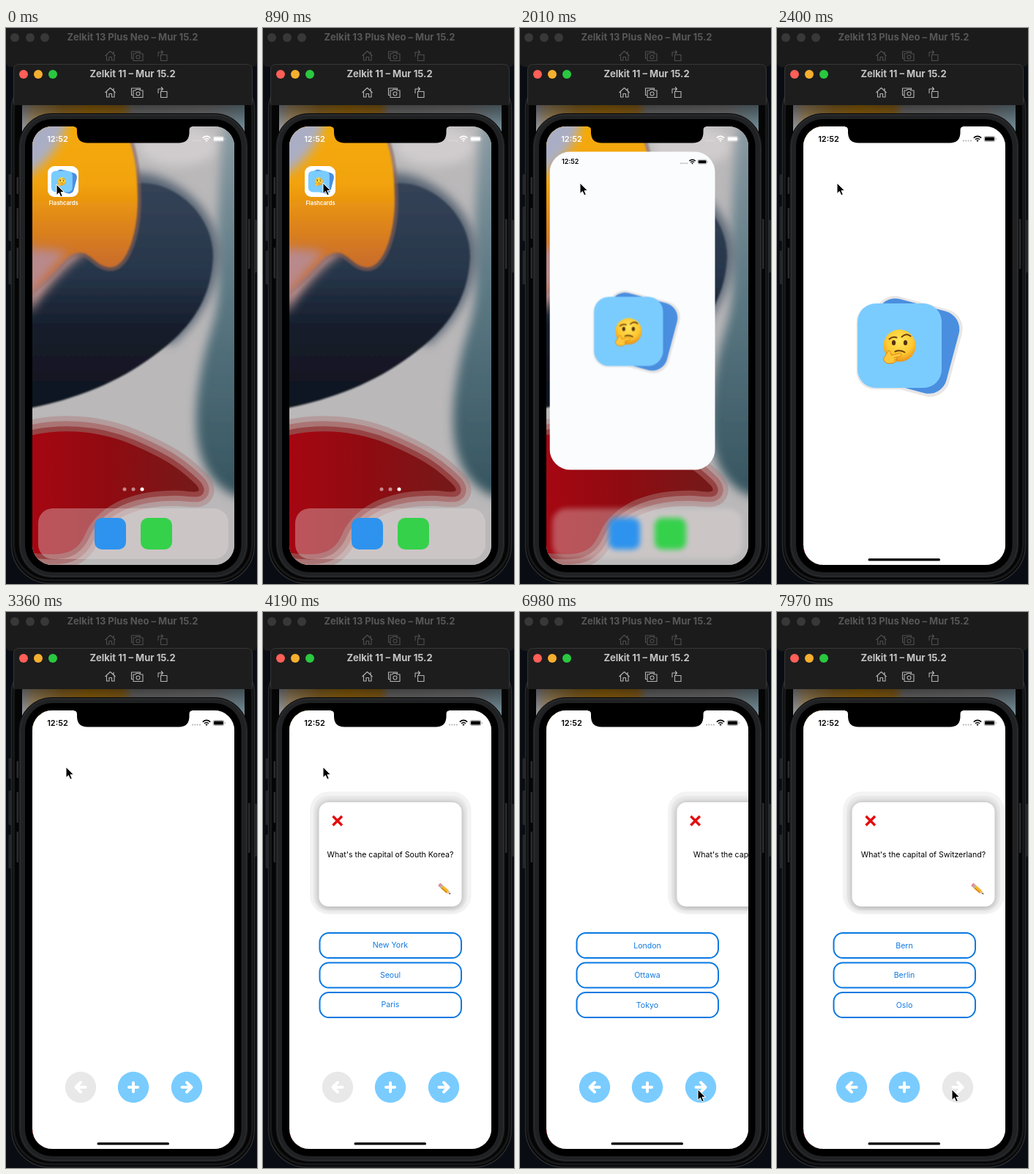
Write an HTML page that moves like this. It is 343 px wide and 757 px high and loops after 8 s.

```html
<!DOCTYPE html>
<html lang="en">
<head>
<meta charset="utf-8">
<title>Flashcards demo</title>
<style>
@property --p { syntax: '<number>'; inherits: true; initial-value: 0; }

html, body { margin: 0; width: 100%; height: 100%; overflow: hidden; background: #090d13; }
svg { position: absolute; left: 0; top: 0; display: block; }
text { font-family: Inter, Roboto, sans-serif; text-anchor: middle; }

.stage { position: relative; width: 343px; height: 757px; overflow: hidden; }
.stage, .stage * { animation: 8s linear infinite; animation-name: none; }
.screen {
  position: absolute; left: 36px; top: 134px; width: 276px; height: 597px;
  border-radius: 27px; overflow: hidden; background: #bab8b9;
}
.title { font-size: 13px; font-weight: 700; }
.clock { font-size: 11px; font-weight: 600; }
.label { font-size: 7.6px; font-weight: 600; fill: #fff; opacity: calc(1 - 3 * var(--p)); }

/* --p runs from icon (0) to full screen (1) */
.screen { animation-name: launch; }
.dock { filter: blur(calc(var(--p) * 5px)); }
.dots { opacity: calc(1 - 1.6 * var(--p)); }
.app {
  position: absolute; left: 0; top: 0; width: 276px; height: 597px;
  color: #000; transform-origin: 0 0;
  background: color-mix(in srgb, #fff calc(var(--p) * 100%), #e6f3fa);
  clip-path: inset(0 0 calc(321px * (1 - var(--p))) 0 round calc(64px - 37px * var(--p)));
  transform:
    translate(calc(21px * (1 - var(--p))), calc(54px + 82px * var(--p) - 136px * var(--p) * var(--p)))
    scale(calc(.1522 + .8478 * var(--p)));
}
.icon { opacity: clamp(0, 1 - 2.3 * var(--p), 1); }
@keyframes launch {
  0%, 20.125% { --p: 0; animation-timing-function: cubic-bezier(.39, 0, .2, 1); }
  30%, 100% { --p: 1; }
}

.splash { animation-name: leave; }
.nav { animation-name: enter; }
.quiz { animation-name: reveal; }
@keyframes leave { 0%, 38.75% { opacity: 1; } 42%, 100% { opacity: 0; } }
@keyframes enter { 0%, 38.75% { opacity: 0; } 42%, 100% { opacity: 1; } }
@keyframes reveal {
  0%, 44.625% { opacity: 0; animation-timing-function: ease-in-out; }
  52.375%, 100% { opacity: 1; }
}

.card { animation-name: slide; }
@keyframes slide {
  0% { transform: none; }
  81.67% { transform: none; animation-timing-function: cubic-bezier(.455, .03, .515, .955); }
  85.419% { transform: translateX(-275px); }
  85.42% { transform: translateX(275px); animation-timing-function: cubic-bezier(.455, .03, .515, .955); }
  89.17% { transform: none; }
  92.963% { transform: none; animation-timing-function: cubic-bezier(.455, .03, .515, .955); }
  96.712% { transform: translateX(-275px); }
  96.713% { transform: translateX(275px); animation-timing-function: cubic-bezier(.471, .028, .571, .821); }
  100% { transform: translateX(9px); }
}

.quiz text { font-size: 10.6px; }
.answers text { fill: #117ae2; }
.answers rect { fill: #fff; stroke: #0a78e2; stroke-width: 2; }
.q1, .q2, .q3, .prev, .next { animation-timing-function: step-end; }
.q1 { animation-name: first; }
.q2 { animation-name: second; }
.q3 { animation-name: third; }
@keyframes first { 0% { opacity: 1; } 85.42%, 100% { opacity: 0; } }
@keyframes second { 0% { opacity: 0; } 85.42% { opacity: 1; } 96.713%, 100% { opacity: 0; } }
@keyframes third { 0% { opacity: 0; } 96.713%, 100% { opacity: 1; } }

.nav circle { fill: #7accff; }
.nav path { fill: none; stroke: #fff; stroke-width: 4; stroke-linecap: round; stroke-linejoin: round; }
.nav .prev { animation-name: enable; }
.nav .next { animation-name: disable; }
@keyframes enable { 0% { fill: #e8e8e8; } 85.42%, 100% { fill: #7accff; } }
@keyframes disable { 0% { fill: #7accff; } 96.713%, 100% { fill: #e8e8e8; } }

.cursor { animation-name: point; }
@keyframes point {
  0%, 6.749% { transform: translate(69px, 213px); }
  6.75%, 10.375% { transform: translate(75px, 212px); }
  11.125%, 56% { transform: translate(82px, 211px); }
  57.375%, 62.6% { transform: translate(121px, 231px); animation-timing-function: ease-in-out; }
  70.625% { transform: translate(244px, 632px); }
  72.6%, 73.4% { transform: translate(251px, 642px); }
  76.25%, 92.4% { transform: translate(243px, 650px); }
  93.5%, 100% { transform: translate(239px, 650px); }
}
</style>
</head>
<body>
<div class="stage">

<!-- simulator windows and device frames -->
<svg width="343" height="757">
  <defs>
    <linearGradient id="strip">
      <stop offset="0" stop-color="#9fa3ae"/><stop offset=".05" stop-color="#b39a70"/>
      <stop offset=".18" stop-color="#a87a2a"/><stop offset=".3" stop-color="#b0780c"/>
      <stop offset=".45" stop-color="#a5731b"/><stop offset=".5" stop-color="#828182"/>
      <stop offset=".85" stop-color="#8a8a8c"/><stop offset="1" stop-color="#7d9aa6"/>
    </linearGradient>
    <linearGradient id="shadow" x2="0" y2="1">
      <stop offset="0" stop-color="#000" stop-opacity=".5"/><stop offset="1" stop-color="#000" stop-opacity="0"/>
    </linearGradient>
    <g id="tools" fill="none" stroke="currentColor" stroke-width="1.1" stroke-linejoin="round">
      <path d="M135.500 88l7-6.500 7 6.500M137.500 87v7h3.500v-4.500h3.500v4.500h3.500v-7M147 85v-3"/>
      <path d="M173.500 91.500h-2v-9.500h12v2"/>
      <path d="M174 85h3l1-1.500h4l1 1.500h4v9.500h-13z"/><circle cx="180.500" cy="89.500" r="2.500"/>
      <path d="M211.500 86.500h8.500v8h-8.500zM208 89v-6h6M212 80.500l2.500 2.500-2.500 2.500"/>
    </g>
    <g id="status" fill="currentColor">
      <text class="clock" x="70.500" y="155">12:52</text>
      <g opacity=".3"><circle cx="255" cy="153.500" r="1.100"/><circle cx="258.300" cy="153.500" r="1.100"/><circle cx="261.600" cy="153.500" r="1.100"/><circle cx="265" cy="153.500" r="1.100"/></g>
      <g fill="none" stroke="currentColor" stroke-width="1.500"><path d="M268.800 149.600q5.200-4.400 10.400 0M270.900 151.800q3.100-2.600 6.200 0"/></g>
      <path d="M274 155l-1.700-1.900q1.700-1.300 3.400 0z"/>
      <rect x="283" y="147.500" width="15" height="7" rx="2.200" fill="none" stroke="currentColor" stroke-opacity=".4" stroke-width=".8"/>
      <rect x="284" y="148.500" width="13" height="5" rx="1.300"/><path d="M299 149.800q1.600 1.200 0 2.400z" opacity=".5"/>
    </g>

    <!-- thinking face, centred on 0,0 -->
    <radialGradient id="skin" cx=".5" cy=".35" r=".65">
      <stop offset="0" stop-color="#ffe65c"/><stop offset=".65" stop-color="#fdc831"/><stop offset="1" stop-color="#e8921a"/>
    </radialGradient>
    <g id="face">
      <circle r="22" fill="url(#skin)"/>
      <ellipse cx="-8" cy="-4" rx="2.600" ry="3.500" fill="#55310d"/><ellipse cx="8" cy="-4" rx="2.600" ry="3.500" fill="#55310d"/>
      <g fill="none" stroke="#6b3d0d" stroke-width="2" stroke-linecap="round">
        <path d="M-14-9q5-4 10-2M3-12q6-6 12-1M-6 8q6-3 13 1"/>
      </g>
      <path d="M-16 8q3-3 4 2l1 3 11-3q4 0 2 4l-6 3q0 6-6 7-10 2-12-6z" fill="#ffc83a" stroke="#dc8615"/>
      <path d="M-8 17l6-2M-8 20l5-2" stroke="#dc8615"/>
    </g>
    <!-- pair of cards, front card centred on 0,0 -->
    <g id="deck">
      <rect x="-57.500" y="-57.500" width="115" height="115" rx="25" transform="translate(17 .5) rotate(15)" fill="#4a8edf"/>
      <rect x="-57.500" y="-57.500" width="115" height="115" rx="25" fill="#7accff"/>
      <use href="#face"/>
    </g>
  </defs>

  <rect width="343" height="757" fill="#090d13"/>
  <g fill="#24272b">
    <rect x="3.500" y="199" width="5" height="28" rx="1.500"/><rect x="3.500" y="243" width="5" height="47" rx="1.500"/>
    <rect x="3.500" y="303" width="5" height="46" rx="1.500"/><rect x="338" y="261" width="5" height="72" rx="1.500"/>
  </g>
  <rect x="7.500" y="60" width="332" height="696" rx="52" fill="#050505" stroke="#2b2c2e" stroke-width="1.500"/>
  <rect x="10.500" y="62" width="326" height="690" rx="50" fill="none" stroke="#171819" stroke-width="3"/>
  <path d="M22 90h304v90H22z" fill="url(#strip)"/>
  <path d="M22 105h304v38H22z" fill="url(#shadow)"/>
  <path d="M0 0h343v46q0 7-7 7H7q-7 0-7-7z" fill="#1b1b1b"/>
  <g fill="#383838"><circle cx="12" cy="13" r="6"/><circle cx="33" cy="13" r="6"/><circle cx="53" cy="13" r="6"/></g>
  <text class="title" x="173" y="17" fill="#575757">Zelkit 13 Plus Neo – Mur 15.2</text>
  <use href="#tools" y="-50" color="#4e4e4e"/>

  <g fill="#2a2b2d">
    <rect x="14.500" y="203" width="4" height="23" rx="1"/><rect x="14.500" y="245" width="4" height="42" rx="1"/>
    <rect x="14.500" y="299" width="4" height="42" rx="1"/><rect x="329.500" y="260" width="4" height="68" rx="1"/>
  </g>
  <rect x="17.500" y="116.500" width="313" height="632" rx="45" fill="#202123" stroke="#0d0d0e"/>
  <rect x="19.500" y="118.500" width="309" height="628" rx="43" fill="none" stroke="#2e2f31"/>
  <rect x="26" y="124" width="295.500" height="617" rx="37" fill="#000"/>
  <path d="M10 105V57q0-8 8-8h311q8 0 8 8v48z" fill="#1d1d1e"/>
  <path d="M10.500 104V57q0-7.500 8-7.500h310q8 0 8 7.500v47" fill="none" stroke="#363637"/>
  <g><circle cx="24" cy="63" r="6" fill="#fe5f57"/><circle cx="44" cy="63" r="6" fill="#f5af2e"/><circle cx="64" cy="63" r="6" fill="#2ac840"/></g>
  <text class="title" x="173" y="67" fill="#c4c4c4">Zelkit 11 – Mur 15.2</text>
  <use href="#tools" color="#b4b4b4"/>
</svg>

<div class="screen">
  <!-- home screen -->
  <svg width="276" height="597" viewBox="36 134 276 597" color="#fff">
    <defs>
      <linearGradient id="amber" x2="0" y2="1">
        <stop offset="0" stop-color="#f5ab06"/><stop offset=".35" stop-color="#f2a30a"/><stop offset=".55" stop-color="#e18a18"/>
        <stop offset=".75" stop-color="#d07426"/><stop offset="1" stop-color="#bb6036"/>
      </linearGradient>
      <linearGradient id="navy" x2="0" y2="1">
        <stop offset="0" stop-color="#354357"/><stop offset=".4" stop-color="#27364a"/>
        <stop offset=".65" stop-color="#151d2b"/><stop offset="1" stop-color="#10131f"/>
      </linearGradient>
      <linearGradient id="teal" x2="0" y2="1">
        <stop offset="0" stop-color="#8a9ba3"/><stop offset=".45" stop-color="#5b7883"/><stop offset="1" stop-color="#35545f"/>
      </linearGradient>
      <linearGradient id="red" x2="1">
        <stop offset="0" stop-color="#a90612"/><stop offset=".5" stop-color="#8f0b11"/><stop offset="1" stop-color="#741a19"/>
      </linearGradient>
      <filter id="soft" x="-30%" y="-30%" width="160%" height="160%"><feGaussianBlur stdDeviation="7"/></filter>
      <filter id="edge" x="-10%" y="-10%" width="120%" height="120%"><feGaussianBlur stdDeviation="1"/></filter>
      <path id="wave" d="M20 558C70 544 125 547 172 567S238 600 260 622C270 634 258 632 240 630 190 628 130 640 108 690 96 716 78 722 20 712z"/>
      <path id="drop" d="M30 130H158c16 28 22 62 22 104 0 48-16 92-37 92-20 0-27-22-45-20-19 2-28 28-68 56z"/>
    </defs>
    <rect x="36" y="134" width="276" height="597" fill="#bab8b9"/>
    <ellipse cx="235" cy="160" rx="55" ry="28" fill="#d0cccd" filter="url(#soft)"/>
    <path d="M299 130h36v510q-30 0-50-24C254 580 256 520 268 460 278 410 292 390 290 340 288 280 290 200 299 130z" fill="url(#teal)" filter="url(#soft)"/>
    <path d="M150 200c62-18 142 40 141 110C288 362 262 400 228 430L150 420z" fill="#566472" filter="url(#soft)"/>
    <path d="M30 300L175 212c52-8 107 40 108 98-2 58-30 95-64 123-52 43-112 70-189 85z" fill="url(#navy)" filter="url(#edge)"/>
    <path d="M30 340L80 285 110 305Q75 325 30 390z" fill="#c29591" filter="url(#soft)"/>
    <use href="#drop" fill="none" stroke="#8a6156" stroke-width="10" opacity=".6" filter="url(#edge)"/>
    <use href="#drop" fill="url(#amber)" filter="url(#edge)"/>
    <path d="M24 300Q55 300 84 305 60 330 24 378z" fill="#b9898b" filter="url(#soft)"/>
    <path d="M20 122h66q-12 52-66 86z" fill="#aaaec4" filter="url(#soft)"/>
    <g stroke-linejoin="round">
      <use href="#wave" fill="#ad7070" stroke="#ad7070" stroke-width="42" opacity=".4"/>
      <use href="#wave" fill="#a45455" stroke="#a45455" stroke-width="28" opacity=".55"/>
      <use href="#wave" fill="#8f3031" stroke="#8f3031" stroke-width="14" opacity=".7"/>
    </g>
    <use href="#wave" fill="url(#red)"/>
    <use href="#status"/>
    <text class="label" x="78.500" y="241">Flashcards</text>
    <g class="dots" fill="#fff">
      <circle cx="162" cy="628" r="2.500" opacity=".5"/><circle cx="174" cy="628" r="2.500" opacity=".5"/><circle cx="186" cy="628" r="2.500"/>
    </g>
    <g class="dock">
      <rect x="44" y="654" width="260" height="69" rx="20" fill="#e8dede" opacity=".36"/>
      <rect x="121" y="667" width="43" height="43" rx="10" fill="#2d93ee"/>
      <rect x="184" y="667" width="43" height="43" rx="10" fill="#35d14b"/>
    </g>
  </svg>

  <!-- flashcard app, shrunk to its icon before launch -->
  <div class="app">
    <svg width="276" height="597" viewBox="36 134 276 597">
      <defs><filter id="shade" x="-20%" y="-20%" width="140%" height="140%"><feGaussianBlur stdDeviation="4"/></filter></defs>
      <use href="#status"/>
      <g class="splash">
        <g fill="#e8e6e5">
          <rect x="-61" y="-61" width="122" height="122" rx="27" transform="translate(185 433.500) rotate(15)"/>
          <rect x="108.500" y="376" width="117" height="116" rx="25"/>
        </g>
        <use href="#deck" x="167.500" y="432.500"/>
      </g>

      <g class="nav">
        <circle class="prev" cx="102" cy="647" r="21.200"/><circle cx="174" cy="647" r="21.200"/><circle class="next" cx="247" cy="647" r="21.200"/>
        <path d="M108.500 647h-12M102 640.500l-6.500 6.500 6.500 6.500M174 641v12M168 647h12M240.500 647h12M247 640.500l6.500 6.500-6.500 6.500"/>
      </g>

      <g class="quiz">
        <g class="card">
          <rect x="64" y="244.500" width="220.500" height="167" rx="26" fill="#f3f3f3"/>
          <rect x="69" y="250" width="210" height="156" rx="20" fill="#ebebeb"/>
          <rect x="76" y="259" width="196" height="144" rx="14" fill="#000" opacity=".28" filter="url(#shade)"/>
          <rect x="76.500" y="259" width="195" height="142" rx="13" fill="#fff"/>
          <path d="M95.500 278l12.500 12.500M108 278l-12.500 12.500" stroke="#e30b0b" stroke-width="3.400"/>
          <g transform="translate(241 371) rotate(41)">
            <path d="M0-2.500h3v5H0q-1.500-2.500 0-5z" fill="#e88a96"/><path d="M3-2.500h2v5H3z" fill="#a9adb0"/>
            <path d="M5-2.500h10v5H5z" fill="#f5b62c"/><path d="M5 .8h10v1.700H5z" fill="#d98a18"/>
            <path d="M15-2.500L20.500 0 15 2.500z" fill="#e6c193"/><path d="M18.300-1L20.500 0l-2.200 1z" fill="#333"/>
          </g>
          <text class="q1" x="174" y="334">What's the capital of South Korea?</text>
          <text class="q2" x="174" y="334">What's the capital of Canada?</text>
          <text class="q3" x="174" y="334">What's the capital of Switzerland?</text>
        </g>
        <g class="answers">
          <rect x="77.500" y="437" width="193.500" height="34" rx="12.500"/>
          <rect x="77.500" y="477.500" width="193.500" height="34" rx="12.500"/>
          <rect x="77.500" y="518" width="193.500" height="34" rx="12.500"/>
          <g class="q1"><text x="174" y="457.500">New York</text><text x="174" y="498">Seoul</text><text x="174" y="538.500">Paris</text></g>
          <g class="q2"><text x="174" y="457.500">London</text><text x="174" y="498">Ottawa</text><text x="174" y="538.500">Tokyo</text></g>
          <g class="q3"><text x="174" y="457.500">Bern</text><text x="174" y="498">Berlin</text><text x="174" y="538.500">Oslo</text></g>
        </g>
      </g>

      <rect x="124.500" y="722.300" width="98.500" height="3.200" rx="1.600"/>
      <g class="icon">
        <rect x="36" y="134" width="276" height="276" fill="#fff"/>
        <use href="#deck" transform="translate(163 271.500) scale(1.66)"/>
      </g>
    </svg>
  </div>
</div>

<!-- notch and pointer -->
<svg width="343" height="757">
  <path d="M93 133h161v1.500q-3.500 0-3.500 4.500v3q0 14.500-14.500 14.500H111.500Q97 156.500 97 142v-3q0-4.500-4-4.500z"/>
  <g class="cursor"><path d="M0 0v14.500l3.400-3 2.300 5.300 2.600-1.100-2.300-5.200h4.500z" stroke="#fff" stroke-width="1"/></g>
</svg>
</div>
</body>
</html>
```
